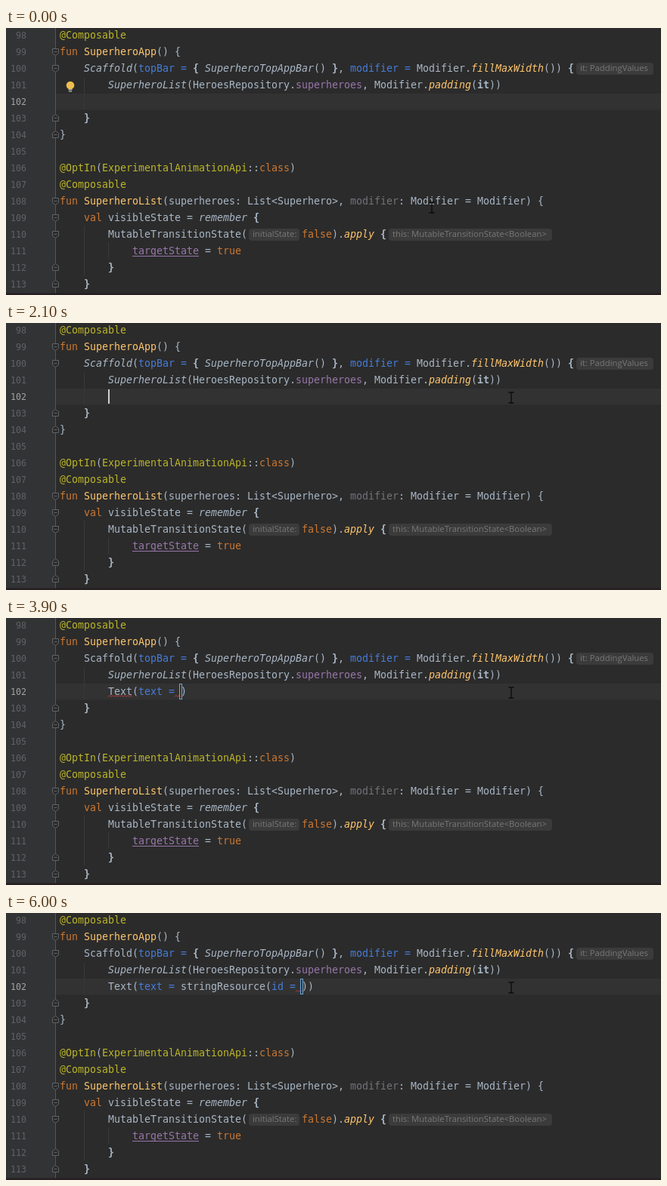
Recreate the animation shown at these times as an HTML page. Size 866 px wide and 354 px high, loop 6.1 s.

```html
<!DOCTYPE html>
<html lang="en">
<head>
<meta charset="utf-8">
<title>Code editor</title>
<style>
html, body { margin: 0; width: 100%; height: 100%; overflow: hidden; background: #2b2b2b; }
svg { display: block; width: 866px; height: 354px; }
text { white-space: pre; font: 13.29px "DejaVu Sans Mono", monospace; fill: #a9b7c6; }
.num { font-size: 11.6px; fill: #606366; text-anchor: end; }
.num.now { fill: #a4a3a3; }
.hint { font: 11.3px "Open Sans", sans-serif; fill: #787878; }
.tip { font: 8.7px "Open Sans", sans-serif; fill: #8c8c8c; }
.tip .link { fill: #589df6; }
.icon { font-size: 10px; font-weight: bold; fill: #2f3133; text-anchor: middle; }
.an { fill: #bbb529; }
.kw { fill: #cc7832; }
.fn { fill: #ffc66d; }
.fi { fill: #ffc66d; font-style: italic; }
.it { font-style: italic; }
.b { font-weight: bold; }
.arg { fill: #467cda; }
.pr { fill: #9876aa; }
.dim { fill: #72737a; }
.name { fill: #c0c2c4; }
.par { fill: #999b9d; }
.pari { fill: #999b9d; font-style: italic; }
</style>
</head>
<body>
<svg viewBox="0 0 866 354" id="stage"></svg>
<script>
const LOOP = 6100, STEP = 100;
const LEFT = 71, CHAR = 8, ROW = 22, BASE = 14;
const stage = document.getElementById('stage');

function el(tag, attrs, parent = stage, content) {
  const node = document.createElementNS('http://www.w3.org/2000/svg', tag);
  for (const key in attrs) node.setAttribute(key, attrs[key]);
  if (content !== undefined) node.textContent = content;
  parent.appendChild(node);
  return node;
}
const box = (x, y, width, height, fill, parent, rx = 0) =>
  el('rect', { x, y, width, height, fill, rx }, parent);
const stroke = (d, color, parent, width = 1) =>
  el('path', { d, fill: 'none', stroke: color, 'stroke-width': width }, parent);
const colX = col => LEFT + col * CHAR;
const show = (node, on) => node.setAttribute('visibility', on ? 'visible' : 'hidden');

// Pieces are "style:text" strings or plain text, laid out on the character grid.
function write(pieces, x, y, parent = stage) {
  const text = el('text', { y }, parent);
  for (const piece of pieces) {
    const [, style, body] = piece.match(/^(?:~(\w+):)?([^]*)$/);
    el('tspan', { x, class: style || '' }, text, body);
    x += body.length * CHAR;
  }
  return text;
}

function hint(label, chipX, width, textX, line) {
  const y = BASE + ROW * line;
  box(chipX, y - 12, width, 16, '#3b3b3b', stage, 4);
  el('text', { x: textX, y: y - 1, class: 'hint' }, stage, label);
}

function squiggle(from, to, y, parent) {
  let d = `M${from} ${y}`;
  for (let x = from + 2, up = true; x <= to; x += 2, up = !up) d += `L${x} ${up ? y - 2 : y}`;
  return stroke(d, '#bc3f3c', parent);
}

// Editor surface
box(0, 0, 866, 354, '#2b2b2b');
box(0, 0, 65, 354, '#313335');
box(66, 87, 800, 21.5, '#323232');
stroke('M65.5 0V354', '#555759');
stroke('M103.5 66V108M103.5 262V328M135.5 284V306', '#393939');

for (let i = 0; i < 16; i++) {
  el('text', { x: 27, y: BASE + ROW * i, class: i === 4 ? 'num now' : 'num' }, stage, 98 + i);
}

function fold(line, dir) {
  const y = 9.5 + ROW * line;
  el('path', {
    d: `M61.5 ${y - 4 * dir}H69.5V${y + 2 * dir}L65.5 ${y + 5 * dir}L61.5 ${y + 2 * dir}ZM63.5 ${y}H67.5`,
    fill: '#2b2b2b', stroke: '#606366'
  });
}
[1, 2, 10, 11, 12].forEach(line => fold(line, 1));
[5, 6, 14, 15].forEach(line => fold(line, -1));

const code = [
  [0, 0, '~an:@Composable'],
  [1, 0, '~kw:fun ', '~fn:SuperheroApp', '() {'],
  [2, 12, '(', '~arg:topBar =', ' ', '~b:{ ', '~it:SuperheroTopAppBar', '() ', '~b:}', ', ',
    '~arg:modifier =', ' Modifier.', '~fi:fillMaxWidth', '()) ', '~b:{'],
  [3, 8, '~it:SuperheroList', '(HeroesRepository.', '~pr:superheroes', ', Modifier.', '~fi:padding', '(', '~b:it', '))'],
  [5, 4, '~b:}'],
  [6, 0, '}'],
  [8, 0, '~an:@OptIn', '(', '~an:ExperimentalAnimationApi', '::', '~kw:class', ')'],
  [9, 0, '~an:@Composable'],
  [10, 0, '~kw:fun ', '~fn:SuperheroList', '(superheroes: List<Superhero>, ', '~dim:modifier', ': Modifier = Modifier) {'],
  [11, 4, '~kw:val ', 'visibleState = ', '~it:remember', ' ', '~b:{'],
  [12, 8, 'MutableTransitionState('],
  [12, 40, '~kw:false', ').', '~fi:apply', ' ', '~b:{'],
  [13, 12, '~pr:targetState', ' = ', '~kw:true'],
  [14, 8, '~b:}'],
  [15, 4, '~b:}']
];
for (const [line, col, ...pieces] of code) write(pieces, colX(col), BASE + ROW * line);
stroke('M167 302.5H255', '#9876aa');

hint('it: PaddingValues', 754, 102, 759, 2);
hint('initialState:', 321, 67, 326, 12);
hint('this: MutableTransitionState<Boolean>', 506, 216, 511, 12);

const scaffold = write(['Scaffold'], colX(4), BASE + ROW * 2);

// Line being edited
const lineY = BASE + ROW * 4;
const textMarks = squiggle(135, 167, 104.5);
const gapMarks = squiggle(0, 8, 104.5);
const slot = el('rect', { y: 87.5, width: 3, height: 20, fill: 'none', stroke: '#6ba5d8' });
const caret = box(0, 88, 2, 19, '#d0d0d0');
const edit = el('g', {});

const bulb = el('g', {});
el('circle', { cx: 85, cy: 76, r: 5.3, fill: '#f0bd4e' }, bulb);
box(82.5, 81, 5, 1.5, '#a0a3a5', bulb);
box(83, 83.2, 4, 1.5, '#a0a3a5', bulb);

box(0, 351.5, 866, 2.5, '#271f22');

// Completion popups
function icon(kind, y, x, parent) {
  if (kind === 'u') {
    box(x - 7, y - 7, 14, 14, '#3f9c68', parent, 3);
    el('path', { d: `M${x} ${y + 7}q0 -5 3.5 -5t3.5 5z`, fill: '#b9bec2' }, parent);
  } else {
    el('circle', { cx: x, cy: y, r: 7, fill: kind === 'f' ? '#b8706f' : '#5591ad' }, parent);
  }
  el('text', { x: x - (kind === 'u' ? 1 : 0), y: y + 4, class: 'icon' }, parent, kind === 'c' ? 'c' : 'f');
}

function popup(x, width, rows) {
  const g = el('g', {}), right = x + width;
  box(x, 107, width, 247, '#46484a', g);
  box(x, 109, width - 9, 19, '#113a5c', g);
  box(right - 9, 109, 8, 26, '#616365', g);
  rows.forEach(([kind, name, rest, type], i) => {
    const y = 118 + 20 * i;
    icon(kind, y, x + 14, g);
    write(['~name:' + name, (kind === 'u' ? '~pari:' : '~par:') + rest], x + 27, y + 5, g);
    write(['~par:' + type], right - 11 - type.length * CHAR, y + 5, g);
  });
  box(x, 341, width, 13, '#3f4244', g);
  const tip = el('text', { x: x + 10, y: 354, class: 'tip' }, g, 'Press Enter to insert, Tab to replace');
  el('tspan', { x: x + 168, class: 'link' }, tip, 'Next Tip');
  for (const y of [346, 349.5, 353]) el('circle', { cx: right - 10, cy: y, r: 1.1, fill: '#b4b6b8' }, g);
  stroke(`M${x + .5} 354V107.5H${right - .5}V354`, '#55585a', g);
  return g;
}

const range = 'offset: Int, length: In…)'.slice(0, -1);
const stringList = popup(204, 500, [
  ['u', 'stringResource', '(id: Int)'],
  ['u', 'stringResource', '(id: Int, vararg formatArgs: Any)'],
  ['f', 'String', '(bytes: ByteArray) (kotlin.text)'],
  ['f', 'String', '(chars: CharArray) (kotlin.text)'],
  ['f', 'String', '(stringBuffer: StringBuffer) (kotlin.text)'],
  ['f', 'String', '(stringBuilder: StringBuilder) (kotlin.tex…'],
  ['f', 'String', '(bytes: ByteArray, charset: Charset) (kotl…'],
  ['f', 'String', '(bytes: ByteArray, ' + range],
  ['f', 'String', '(chars: CharArray, ' + range],
  ['f', 'String', '(codePoints: IntArray, offset: Int, length…'],
  ['f', 'String', '(bytes: ByteArray, ' + range],
  ['f', 'buildString', ' {...} (builderAction: StringBuilder.…']
].map(row => [...row, 'String']));

const textList = popup(108, 506, [
  ['u', 'Text', '(text: String, modifier: Modifier, …)', 'Unit'],
  ['u', 'Text', '(text: AnnotatedString, …)', 'Unit'],
  ['u', 'TextButton', '(onClick: () -> Unit, …) {...}', 'Unit'],
  ['u', 'TextField', '(value: String, …)', 'Unit'],
  ['u', 'TextField', '(value: TextFieldValue, …)', 'Unit'],
  ...['Style', 'Align', 'Unit', 'Range', 'Overflow', 'Decoration', 'Indent'].map(part =>
    ['c', 'Text' + part, ' (androidx.compose.ui.text)', ''])
]);

const mouse = el('g', {});
stroke('M-3.5 -7H-1Q0 -7 0 -6Q0 -7 1 -7H3.5M0 -6V6M-3.5 7H-1Q0 7 0 6Q0 7 1 7H3.5', '#0b0b0b', mouse, 1.3);

const within = (t, ...spans) => spans.some(([from, to]) => t >= from && t < to);

function linePieces(t) {
  if (t < 2300) return [];
  if (t < 2400) return ['T'];
  if (t < 2700) return ['Te'];
  if (t < 2800) return ['Tex'];
  if (t < 3000) return ['Text'];
  const head = ['Text(', (t >= 3400 ? '~arg:' : '') + 'text =', ' '];
  if (t < 4900) return [...head, ')'];
  return [...head, 'stringResource(', (t >= 5600 ? '~arg:' : '') + 'id =', ' ', '))'];
}

function caretCol(t) {
  if (t < 2000) return 0;
  if (t < 3000) return 8 + linePieces(t).join('').length;
  return t < 4900 ? 20 : 40;
}

let last = -1;
function render(time) {
  const t = Math.floor(time % LOOP / STEP) * STEP;
  if (t === last) return;
  last = t;

  const p = Math.min(t / 600, 1), ease = p * p * (3 - 2 * p);
  mouse.setAttribute('transform', `translate(${563 + 105 * ease} ${238 - 139 * ease})`);
  show(bulb, t < 600);

  edit.replaceChildren();
  write(linePieces(t), colX(8), lineY - 0.5, edit);
  scaffold.firstChild.setAttribute('class', t < 3400 ? 'it' : '');

  const x = colX(caretCol(t));
  caret.setAttribute('x', x);
  slot.setAttribute('x', x - 1.5);
  gapMarks.setAttribute('transform', `translate(${x - 8} 0)`);
  show(caret, within(t, [600, 1100], [1600, 3500], [4000, 4600], [5100, 5600]));
  show(slot, t >= 3000);
  show(textMarks, within(t, [3400, 5200]));
  show(gapMarks, within(t, [3400, 4900], [5900, LOOP]));
  show(textList, within(t, [2500, 3000]));
  show(stringList, within(t, [4000, 4700]));
}

const start = performance.now();
function tick() {
  render(performance.now() - start);
  requestAnimationFrame(tick);
}
render(0);
requestAnimationFrame(tick);
</script>
</body>
</html>
```
